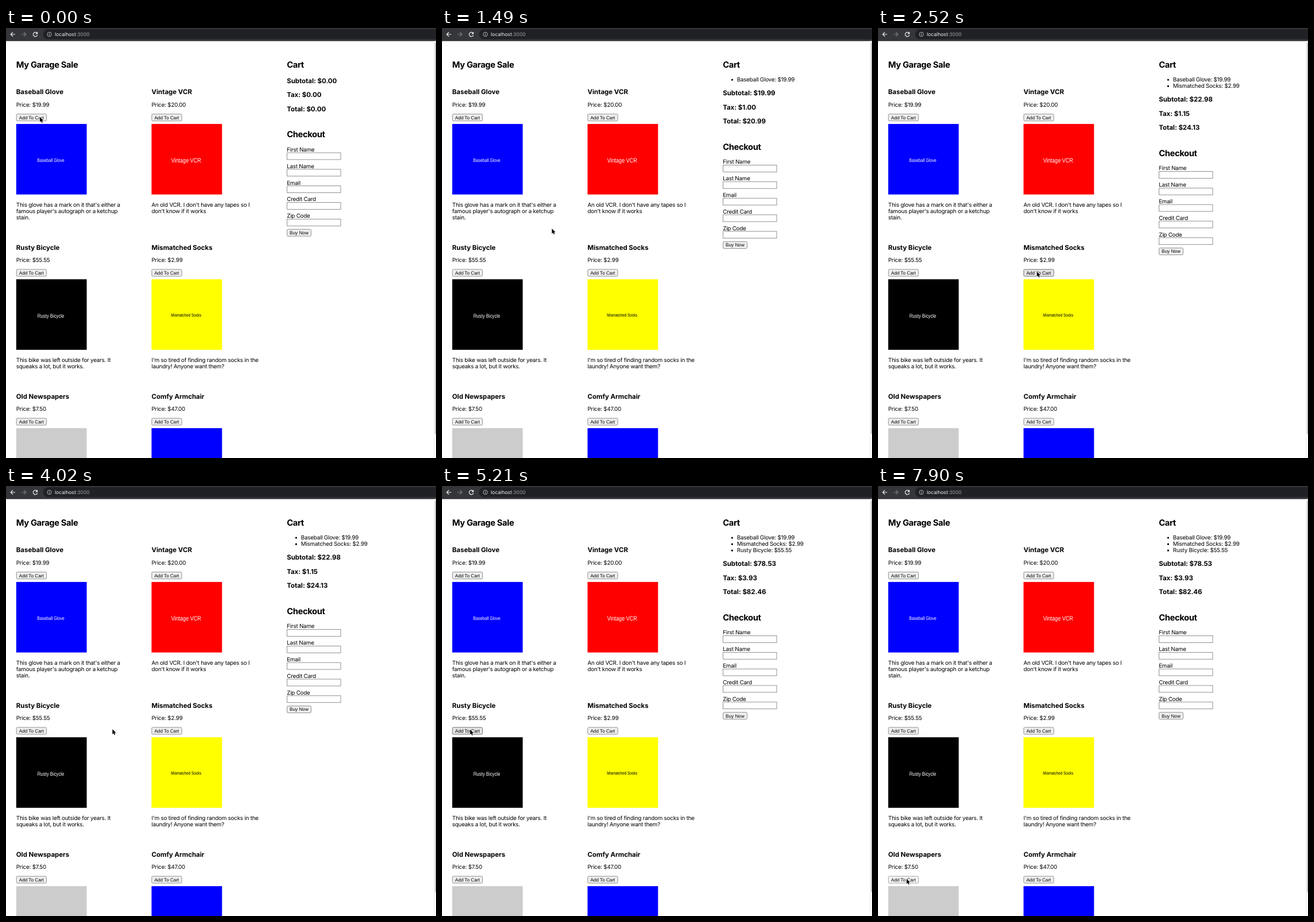
Recreate the animation shown at these times as an HTML page. Size 749 by 748 pixels, loop 8000 ms.

```html
<!DOCTYPE html>
<html lang="en">
<head>
<meta charset="utf-8">
<title>My Garage Sale</title>
<style>
  html, body { margin: 0; width: 100%; height: 100%; overflow: hidden; background: #fff; }
  svg { display: block; width: 749px; height: 748px; }
  text { font-family: Inter, sans-serif; font-size: 9.82px; letter-spacing: -0.0215em; text-rendering: geometricPrecision; white-space: pre; }
  .h2 { font-size: 14.72px; font-weight: 700; letter-spacing: -0.025em; }
  .h3 { font-size: 11.48px; font-weight: 700; letter-spacing: -0.002em; }
  .url { font-size: 8.6px; letter-spacing: 0; }
  .btn, .label { font-family: "Liberation Sans", Arial, sans-serif; letter-spacing: 0; }
  .btn { font-size: 8.18px; }
  .label { text-anchor: middle; }
</style>
</head>
<body>
<svg id="stage" viewBox="0 0 749 748" xmlns="http://www.w3.org/2000/svg"></svg>
<script>
const NS = "http://www.w3.org/2000/svg";
const stage = document.getElementById("stage");
const LOOP = 8000, LINE = 11.04, COLS = [17.8, 253.5, 489.2], ROWS = [0, 270.2, 529.2];

function add(parent, tag, attrs, content) {
  const el = document.createElementNS(NS, tag);
  for (const key in attrs) el.setAttribute(key, attrs[key]);
  if (content !== undefined) el.textContent = content;
  parent.appendChild(el);
  return el;
}
const rect = (parent, x, y, width, height, fill, more) =>
  add(parent, "rect", { x, y, width, height, fill, ...more });
const text = (parent, x, y, content, cls = "", fill = "#000") =>
  add(parent, "text", { x, y, class: cls, fill }, content);
const line = (d, stroke, width = 1.2) =>
  add(stage, "path", { d, stroke, fill: "none", "stroke-width": width });

function button(parent, x, y, width, content) {
  const box = rect(parent, x + 0.4, y + 0.4, width - 0.8, 11.9, "#efefef",
    { rx: 1.6, stroke: "#767676", "stroke-width": 0.8 });
  text(parent, x + 4.9, y + 9.2, content, "btn");
  return box;
}

const products = [
  { name: "Baseball Glove", price: 19.99, color: "#00f", size: 8.6, base: 232.7,
    about: ["This glove has a mark on it that's either a", "famous player's autograph or a ketchup", "stain."] },
  { name: "Vintage VCR", price: 20, color: "#f00", size: 11, base: 234.3,
    about: ["An old VCR. I don't have any tapes so I", "don't know if it works"] },
  { name: "Rusty Bicycle", price: 55.55, color: "#000", size: 9.5, base: 233.3,
    about: ["This bike was left outside for years. It", "squeaks a lot, but it works."] },
  { name: "Mismatched Socks", price: 2.99, color: "#ff0", ink: "#000", size: 7.7, base: 232.2,
    about: ["I'm so tired of finding random socks in the", "laundry! Anyone want them?"] },
  { name: "Old Newspapers", price: 7.5, color: "#ccc", about: [] },
  { name: "Comfy Armchair", price: 47, color: "#00f", about: [] }
];
const money = n => "$" + n.toFixed(2);

// Product grid
text(stage, COLS[0], 69, "My Garage Sale", "h2");
const buttons = products.map((p, i) => {
  const x = COLS[i % 2];
  const card = add(stage, "g", { transform: `translate(0 ${ROWS[i >> 1]})` });
  text(card, x, 115.4, p.name, "h3");
  text(card, x, 137.3, "Price: " + money(p.price));
  const box = button(card, x, 149.3, 53, "Add To Cart");
  rect(card, x, 166.9, 122.8, 122.7, p.color);
  if (p.size) {
    // Condensed face for the picture captions
    add(card, "text", { class: "label", fill: p.ink || "#fff", style: `font-size:${p.size}px`,
      transform: `translate(${x + 60.2} ${p.base}) scale(.82 1)` }, p.name);
  }
  p.about.forEach((row, k) => text(card, x, 310.5 + k * LINE, row));
  return box;
});

// Cart and checkout
text(stage, COLS[2], 69, "Cart", "h2");
const items = [0, 3, 2].map((id, k) => {
  const g = add(stage, "g", {}), p = products[id], y = 93.3 + k * LINE;
  add(g, "circle", { cx: 505.4, cy: y - 3.2, r: 1.6 });
  text(g, 513.8, y, `${p.name}: ${money(p.price)}`);
  return g;
});
const panel = add(stage, "g", {});
const sums = [0, 1, 2].map(k => text(panel, COLS[2], 95.7 + k * 24.4, "", "h3"));
text(panel, COLS[2], 190.4, "Checkout", "h2");
["First Name", "Last Name", "Email", "Credit Card", "Zip Code"].forEach((name, k) => {
  const y = k * 28.83;
  text(panel, COLS[2], 214.9 + y, name);
  rect(panel, COLS[2] + 0.4, 217 + y, 93.4, 11.9, "#fff", { stroke: "#767676", "stroke-width": 0.8 });
});
button(panel, COLS[2], 349.8, 42.6, "Buy Now");

// Browser bar
rect(stage, 0, 0, 749, 22.8, "#35363a");
rect(stage, 64.5, 2, 700, 17.6, "#202124", { rx: 8.8 });
line("M16 11H8.3M12 7.2L8.2 11L12 14.8", "#f1f3f4");
line("M27 11H34.7M31 7.2L34.8 11L31 14.8", "#7d7e81");
line("M53.8 8.6A3.7 3.7 0 1 0 54.6 12.2", "#f1f3f4");
add(stage, "path", { d: "M55.2 6.6V10.6H51.2Z", fill: "#f1f3f4" });
add(stage, "circle", { cx: 75.5, cy: 11, r: 3.7, fill: "none", stroke: "#d5d7da", "stroke-width": 0.8 });
line("M75.5 10.5V13.2M75.5 8.7V9.6", "#d5d7da", 0.9);
const url = text(stage, 85, 14.1, "", "url", "#f1f3f4");
add(url, "tspan", {}, "localhost");
add(url, "tspan", { fill: "#9aa0a6" }, ":3000");

// Scroll bar, cut by the right edge
rect(stage, 745, 22.8, 4, 726, "#fafafa");
rect(stage, 745, 22.8, 0.6, 726, "#ececec");
rect(stage, 747.1, 24.5, 8, 682, "#c1c1c1", { rx: 2.4 });

const cursor = add(stage, "path", {
  d: "M0 0V8.9L2 7L3.3 10.1L4.9 9.4L3.6 6.4H6.3Z",
  stroke: "#fff", "stroke-width": 1.3, "stroke-linejoin": "round", "paint-order": "stroke"
});

// Each step: start time, then the values held from there on
const moves = [
  [0, 58.6, 154.4], [1340, 93.5, 237], [1490, 191, 348.5], [1640, 254.5, 396.5], [1790, 268.5, 414],
  [1930, 275.2, 422.5], [2080, 275.5, 424], [2230, 276.3, 423.3], [4020, 185, 422.6],
  [4170, 96.8, 428.2], [4310, 63, 428], [4460, 48.4, 423.5], [4610, 48.4, 422.4],
  [4760, 48.8, 422.6], [4910, 48.4, 423.2], [6410, 50.7, 457.4], [6560, 46, 568.5],
  [6710, 46, 641.6], [6850, 48.8, 681], [7000, 49.3, 682.8]
];
const looks = {
  rest: ["#efefef", "#767676"],
  hover: ["#e5e5e5", "#4f4f4f"],
  press: ["#f5f5f5", "#8d8d8d"]
};
const states = [
  [0, 0, "rest"], [300, 0, "press"], [450, 0, "hover"], [1340, 0, "rest"],
  [1930, 3, "hover"], [4020, 3, "rest"], [4460, 2, "hover"], [6560, 2, "rest"],
  [7000, 4, "hover"], [7900, 4, "press"]
];
const bills = [[0, 0, 0, 0], [450, 19.99, 1, 20.99], [2520, 22.98, 1.15, 24.13], [5210, 78.53, 3.93, 82.46]];
const stepAt = (steps, t) => steps.filter(s => s[0] <= t).length - 1;

function draw(t) {
  const [, x, y] = moves[stepAt(moves, t)];
  cursor.setAttribute("transform", `translate(${x + 0.4} ${y + 0.4})`);

  const [, active, look] = states[stepAt(states, t)];
  buttons.forEach((box, i) => {
    const [fill, stroke] = looks[i === active ? look : "rest"];
    box.setAttribute("fill", fill);
    box.setAttribute("stroke", stroke);
  });

  const count = stepAt(bills, t);
  items.forEach((g, k) => g.setAttribute("visibility", k < count ? "visible" : "hidden"));
  panel.setAttribute("transform", `translate(0 ${count ? 10.4 + count * LINE : 0})`);
  ["Subtotal", "Tax", "Total"].forEach((name, k) => {
    sums[k].textContent = `${name}: ${money(bills[count][k + 1])}`;
  });
}

const start = performance.now();
function tick() {
  draw((performance.now() - start) % LOOP);
  requestAnimationFrame(tick);
}
draw(0);
requestAnimationFrame(tick);
</script>
</body>
</html>
```
